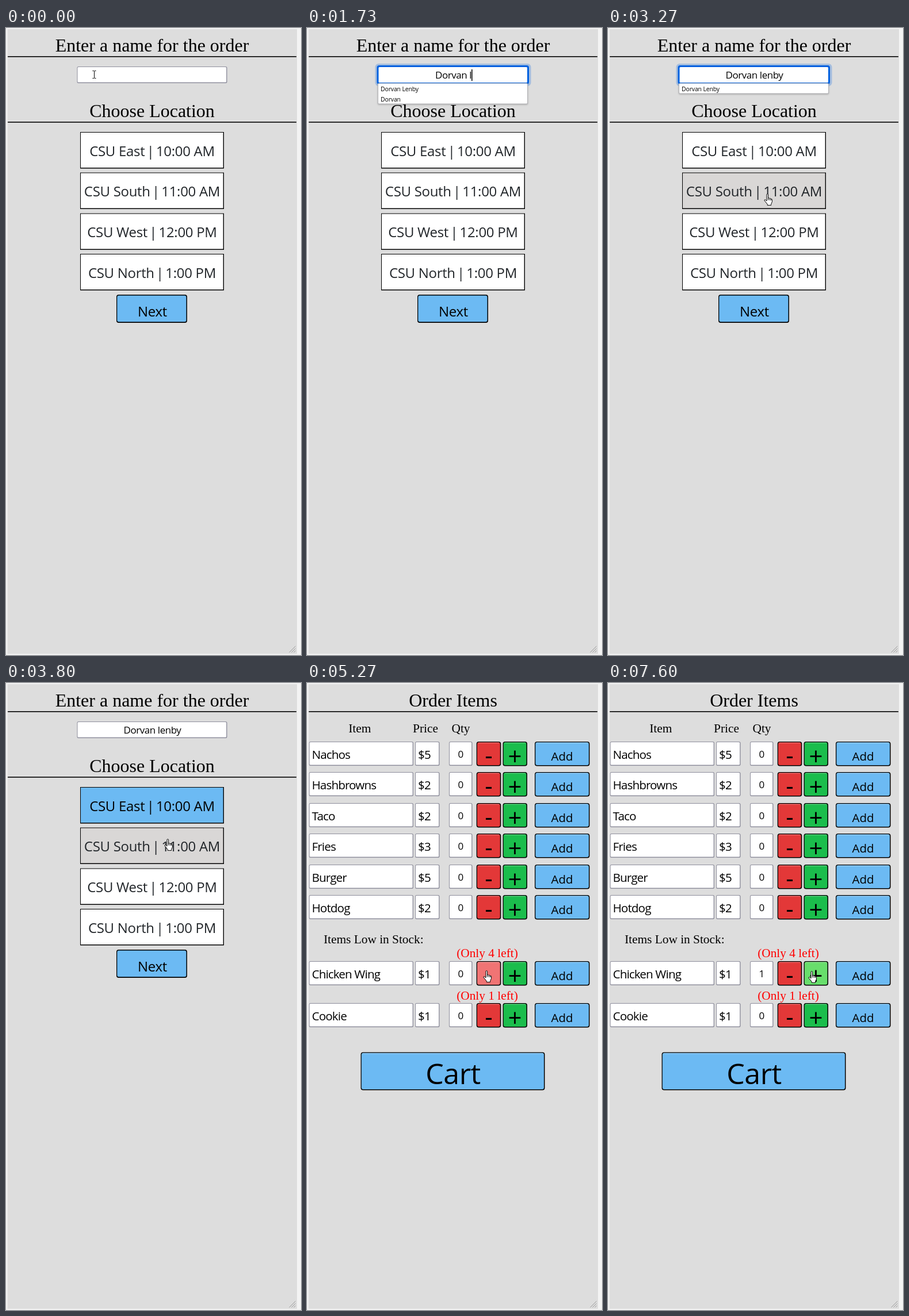
An HTML page with a canvas that plays this animation: 513 px wide and 1091 px high, repeating every 8000 ms.

```html
<!DOCTYPE html>
<html lang="en">
<head>
<meta charset="utf-8">
<title>Order form</title>
<style>
html, body { margin: 0; width: 100%; height: 100%; overflow: hidden; background: #f3f3f3; }
canvas { display: block; }
</style>
</head>
<body>
<canvas id="stage" width="513" height="1091"></canvas>
<script>
const ctx = document.getElementById('stage').getContext('2d');
const LOOP = 8000;
const SANS = '"Open Sans", "Noto Sans", sans-serif';
const SERIF = '"Liberation Serif", "Noto Serif", serif';
const BLUE = '#6cbaf3', BLUE_HOVER = '#9fd2fb';
const RED = '#e33838', RED_HOVER = '#f07474';
const GREEN = '#1bbd4c', GREEN_HOVER = '#68de6c';

const places = [
  ['CSU East', '10:00 AM', 181],
  ['CSU South', '11:00 AM', 251.5],
  ['CSU West', '12:00 PM', 322.5],
  ['CSU North', '1:00 PM', 393]
];
const items = [
  ['Nachos', 5], ['Hashbrowns', 2], ['Taco', 2], ['Fries', 3],
  ['Burger', 5], ['Hotdog', 2], ['Chicken Wing', 1], ['Cookie', 1]
];
const rowTop = i => i < 6 ? Math.round(101.7 + i * 53.5) : 484 + (i - 6) * 73;

const NAME = 'Dorvan lenby';
const typed = [[800, 1], [930, 2], [1070, 3], [1200, 4], [1330, 5], [1400, 6],
  [1530, 7], [1730, 8], [1800, 9], [1930, 10], [2000, 12]];
const matches = ['Dorvan Lenby', 'Dorvan', 'Do', 'D'];
const matchCount = [[870, 4], [1000, 3], [1130, 2], [1800, 1], [3530, 0]];

// Pointer path: time, x, y of the hot spot
const path = [
  [0, 153, 81], [70, 153, 81], [200, 156, 62], [400, 181, 92], [2400, 181, 92],
  [2700, 225, 150], [2930, 268, 340], [3060, 274, 362], [3270, 277, 288],
  [3470, 280, 215], [3600, 282, 215], [3800, 281, 271], [3930, 279, 320],
  [4130, 272, 456], [4330, 268, 485], [4870, 268, 485], [5070, 192, 495],
  [5270, 312, 500], [5530, 316, 300], [5730, 318, 118], [5930, 360, 118],
  [6200, 359, 301], [6470, 362, 430], [6600, 392, 490], [6670, 405, 499],
  [6800, 330, 503], [6930, 354, 501], [8000, 354, 501]
];

const handShape = new Path2D('M5 13V2.2Q5 .6 6.3 .6T7.6 2.2V8Q9.6 7 10.1 8.6Q12 7.8 12.4 9.5Q14.4 9 14.4 11V14.5L12.6 18.5V20.4H6.2V18.6L1 12.2Q.8 10.4 2.6 10.8L5 13Z');
const knuckles = new Path2D('M7.6 8V11.5M10.1 8.6V11.8M12.4 9.5V12');
const arrowShape = new Path2D('M0 0V15L3.5 11.8L6 17.5L8.5 16.5L6 11H11Z');
const beamShape = new Path2D('M-3 -6.5H-1L0 -6L1 -6.5H3M0 -6V6M-3 6.5H-1L0 6L1 6.5H3');

function stepValue(list, t) {
  let v = 0;
  for (const [at, n] of list) if (t >= at) v = n;
  return v;
}

function pointerAt(t) {
  const i = Math.max(1, path.findIndex(p => p[0] >= t));
  const [t0, x0, y0] = path[i - 1], [t1, x1, y1] = path[i];
  const k = (t - t0) / (t1 - t0);
  return { x: x0 + (x1 - x0) * k, y: y0 + (y1 - y0) * k };
}

const inside = (p, x, y, w, h) => p.x >= x && p.x < x + w && p.y >= y && p.y < y + h;

function text(str, x, y, size, { font = SANS, weight = 400, align = 'center', color = '#000', gap = 0 } = {}) {
  ctx.font = `${weight} ${size}px ${font}`;
  ctx.letterSpacing = gap + 'px';
  ctx.textAlign = align;
  ctx.fillStyle = color;
  ctx.fillText(str, x, y);
}
const serif = (str, x, y, size, opt) => text(str, x, y, size, { font: SERIF, ...opt });

function rect(x, y, w, h, color) {
  ctx.fillStyle = color;
  ctx.fillRect(x, y, w, h);
}

function round(x, y, w, h, r, color) {
  ctx.fillStyle = color;
  ctx.beginPath();
  ctx.roundRect(x, y, w, h, r);
  ctx.fill();
}

function field(x, y, w, h) {
  round(x, y, w, h, 2.5, '#8f8f9d');
  round(x + 1, y + 1, w - 2.4, h - 2.4, 1.5, '#fff');
}

function button(x, y, w, h, color) {
  round(x, y, w, h, 4, '#000');
  round(x + 1.3, y + 1.3, w - 2.8, h - 2.8, 3, color);
  rect(x + 3, y + 1.6, w - 6, 1.2, 'rgba(255,255,255,.3)');
}

function heading(str, y) {
  serif(str, 254, y, 32);
  rect(3, y + 8, 502, 1.6, '#000');
}

function nameField(t) {
  const focused = t >= 270 && t < 3530;
  if (focused) {
    round(118.5, 62, 271, 39, 6, 'rgba(0,96,223,.26)');
    round(121.5, 65, 264.5, 33, 4, '#0060df');
    round(124.5, 68, 258.5, 27, 1.5, '#fff');
  } else {
    field(123.5, 67, 261, 29);
  }
  const str = NAME.slice(0, stepValue(typed, t));
  text(str, 254.5, 88, 17, { weight: 500, gap: -0.45 });
  const caretOn = focused && t < 2470;
  if (caretOn) rect(254.5 + ctx.measureText(str).width / 2, 72, 1.5, 20, '#000');
}

function suggestions(t, p) {
  const n = stepValue(matchCount, t);
  if (!n) return;
  ctx.save();
  ctx.shadowColor = 'rgba(0,0,0,.25)';
  ctx.shadowBlur = 3;
  ctx.shadowOffsetY = 1;
  round(123, 96, 261, n * 18 + 0.5, 2, '#b4b4b8');
  ctx.restore();
  round(124, 96.8, 259, n * 18 - 1.3, 1.5, '#fff');
  for (let i = 0; i < n; i++) {
    const y = 97 + i * 18;
    if (t >= 2330 && inside(p, 124, y, 259, 17)) rect(124, y, 259, 17, '#e4e4e6');
    text(matches[i], 128, y + 12.6, 10.4, { align: 'left', weight: 500, gap: -0.1 });
  }
}

function placeLabel(name, time, y, color) {
  const style = { align: 'left', gap: -0.3, color };
  ctx.font = `24px ${SANS}`;
  ctx.letterSpacing = '-0.3px';
  const w = ctx.measureText(name).width, total = w + 19.5 + ctx.measureText(time).width;
  const x = 254 - total / 2;
  text(name, x, y, 24, style);
  text('|', x + w + 9.9, y, 24, { color });
  text(time, x + w + 19.5, y, 24, style);
}

function locationPage(t, p) {
  heading('Enter a name for the order', 41);
  heading('Choose Location', 155);
  nameField(t);
  places.forEach(([name, time, y], i) => {
    const chosen = i === 0 && t >= 3530;
    const hover = inside(p, 129, y, 250, 63);
    rect(129, y, 250, 63.5, '#000');
    rect(130, y + 1, 247.6, 61, chosen ? BLUE : hover ? '#d9d7d6' : '#fff');
    placeLabel(name, time, y + 41.5, chosen ? '#000' : '#212529');
  });
  const hover = inside(p, 192, 464, 123, 49);
  round(192, 464, 123, 49, 4, '#000');
  round(193.3, 465.5, 120.2, 45.8, 3, hover ? BLUE_HOVER : BLUE);
  text('Next', 254.5, 502, 24, { gap: -0.3 });
  suggestions(t, p);
}

function itemRow([name, price], y, qty, p, pressed) {
  const left = { align: 'left', weight: 500, gap: -0.8 };
  const over = (x, w) => inside(p, x, y, w, 42);
  field(3.5, y, 181.5, 42);
  text(name, 8.5, y + 30, 20.5, left);
  field(188, y, 42.5, 42);
  text('$' + price, 193, y + 30, 20.5, left);
  field(247, y, 40.5, 42);
  text(qty, 267.3, y + 27.5, 17, { weight: 500 });
  button(294.7, y, 42.6, 42.4, over(295, 42) ? RED_HOVER : RED);
  text('-', 316, y + 39, 42);
  button(340.5, y, 42.5, 42.4, over(341, 42) && !pressed ? GREEN_HOVER : GREEN);
  text('+', 361.5, y + 41, 42);
  button(396, y, 95.5, 42.4, over(396, 95) ? BLUE_HOVER : BLUE);
  text('Add', 443.5, y + 33, 20.5);
}

function itemsPage(t, p) {
  const size = 21.33;
  heading('Order Items', 41);
  serif('Item', 91.7, 86, size);
  serif('Price', 206, 86, size);
  serif('Qty', 267.5, 86, size);
  items.forEach((item, i) => {
    const wing = i === 6;
    itemRow(item, rowTop(i), wing && t >= 7530 ? 1 : 0, p, wing && t >= 7470 && t < 7600);
  });
  serif('Items Low in Stock:', 29, 453, size, { align: 'left' });
  serif('(Only 4 left)', 313.5, 476.5, size, { color: '#f00' });
  serif('(Only 1 left)', 313.5, 550.5, size, { color: '#f00' });
  button(93.5, 642.5, 320, 66, BLUE);
  text('Cart', 254, 698, 50, { gap: -0.5 });
}

function cursorKind(t, p) {
  if (t < 4600) {
    if (t >= 4470) return 'arrow';
    if (inside(p, 124, 67, 261, 29)) return 'beam';
    const onPlace = places.some(r => inside(p, 129, r[2], 250, 63));
    return onPlace || inside(p, 192, 464, 123, 49) ? 'hand' : 'arrow';
  }
  if (t < 4930 || !items.some((_, i) => inside(p, 0, rowTop(i), 513, 42))) return 'arrow';
  if (p.x < 230) return 'beam';
  const onButton = [[295, 42], [341, 42], [396, 95]].some(([x, w]) => p.x >= x && p.x < x + w);
  return onButton ? 'hand' : 'arrow';
}

function drawCursor(t, p) {
  if (t >= 800 && t < 2330) return;
  const kind = cursorKind(t, p);
  ctx.save();
  ctx.translate(p.x, p.y);
  ctx.lineWidth = 1;
  ctx.strokeStyle = '#000';
  ctx.fillStyle = '#fff';
  if (kind === 'beam') {
    ctx.translate(0.5, 0);
    ctx.stroke(beamShape);
  } else if (kind === 'hand') {
    ctx.translate(-6, 0);
    ctx.fill(handShape);
    ctx.stroke(handShape);
    ctx.stroke(knuckles);
  } else {
    ctx.fill(arrowShape);
    ctx.stroke(arrowShape);
  }
  ctx.restore();
}

function panel() {
  rect(0, 0, 513, 1091, '#f3f3f3');
  rect(2.5, 2, 503.5, 1087, '#ddd');
  ctx.strokeStyle = '#999';
  ctx.lineWidth = 1;
  ctx.beginPath();
  for (const d of [11, 7, 3]) {
    ctx.moveTo(503.5 - d, 1086.5);
    ctx.lineTo(503.5, 1086.5 - d);
  }
  ctx.stroke();
}

function draw(now) {
  // The screen advances at 15 steps a second
  const tick = 200 / 3;
  const t = Math.round(Math.floor((now % LOOP + 4) / tick) * tick / 10) * 10 % LOOP;
  const p = pointerAt(t);
  panel();
  (t < 4600 ? locationPage : itemsPage)(t, p);
  drawCursor(t, p);
  requestAnimationFrame(draw);
}
requestAnimationFrame(draw);
</script>
</body>
</html>
```
